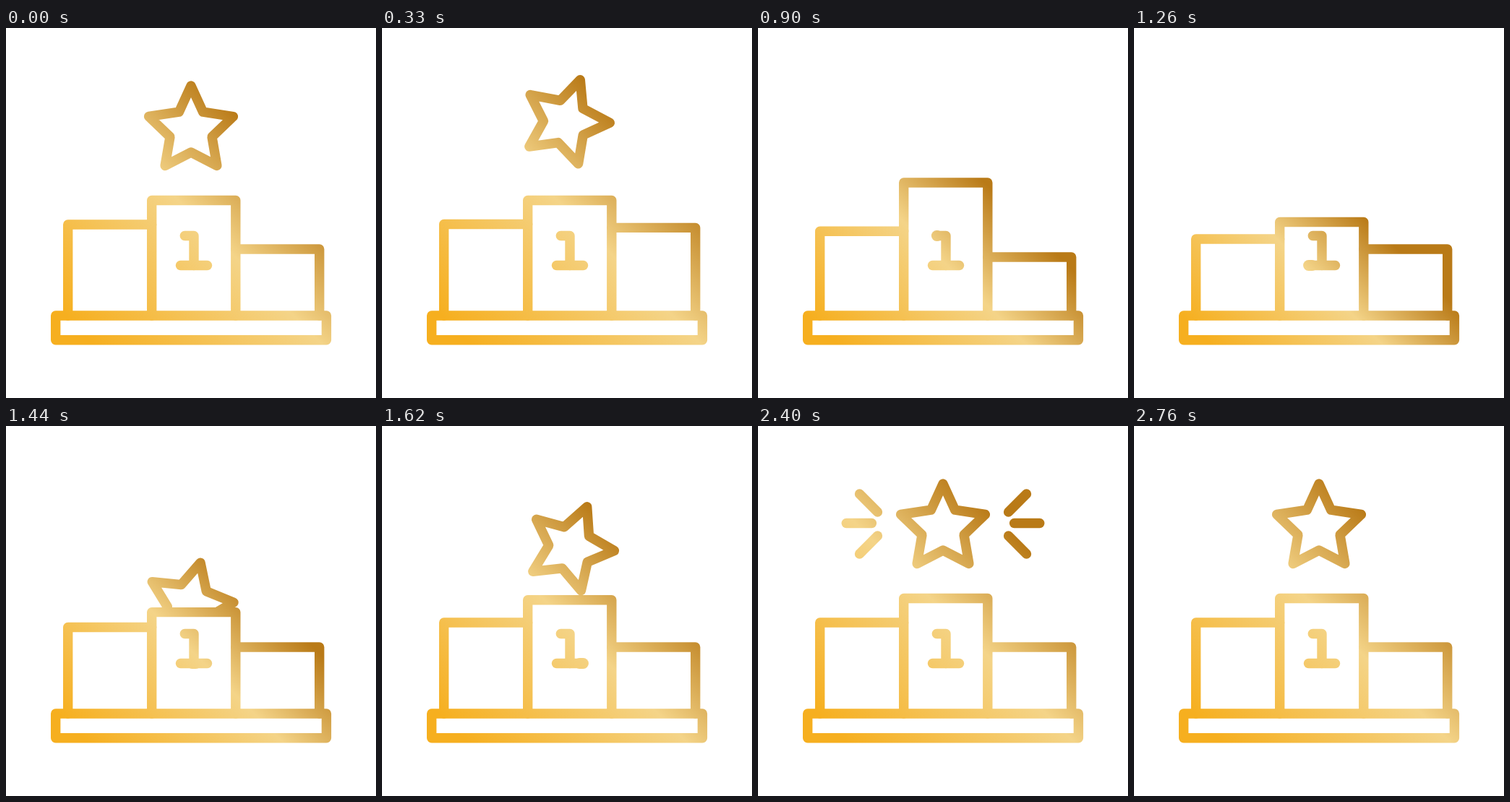
These frames come from a looping animation (512x512 px, 2.91 s). An HTML page with a canvas:

```html
<!DOCTYPE html>
<html lang="en">
<head>
<meta charset="utf-8">
<title>Podium</title>
<style>
  html, body { margin: 0; width: 100%; height: 100%; overflow: hidden; background: #fff; }
  canvas { display: block; width: 100vw; height: 100vh; }
</style>
</head>
<body>
<canvas id="stage" width="512" height="512"></canvas>
<script>
const ctx = document.getElementById('stage').getContext('2d');
const LOOP = 2910, LINE = 13.4, HALF = LINE / 2;
const BASE = { left: 68.7, right: 443.4, top: 398, bottom: 431.7 };
const STAR_PIVOT = 135.2, STAR_DROP = 212;

const clamp = v => Math.min(1, Math.max(0, v));
const span = (t, a, b) => clamp((t - a) / (b - a));
const sine = p => (1 - Math.cos(Math.PI * p)) / 2;
const quadOut = p => 1 - (1 - p) ** 2;
const backIn = p => p * p * (2.4 * p - 1.4);

// Vertical offset of each box: [time, offset] keys, eased in and out.
const RIGHT = [[60, 0], [510, -45], [840, 13], [1080, 0]];
const LEFT = [[300, 0], [660, -27], [1060, 28], [1620, 0]];
const CENTER = [[600, 0], [930, -25], [1260, 30], [1700, 0]];

function track(keys, t) {
  let value = keys[0][1];
  for (let i = 1; i < keys.length; i++) {
    const [t0, v0] = keys[i - 1], [t1, v1] = keys[i];
    if (t >= t0) value = v0 + (v1 - v0) * sine(span(t, t0, t1));
  }
  return value;
}

// Half of the star outline, relative to its pivot, mirrored for the rest.
const SIDE = [[16.6, -19], [58.4, -12.7], [29, 15.5], [35.9, 55.3]];
const STAR = [[0, -55.2], ...SIDE, [0, 36.8],
  ...SIDE.slice().reverse().map(([x, y]) => [-x, y])];

function starDrop(t) {
  return STAR_DROP * (t < 1000
    ? backIn(span(t, 0, 675))
    : 1 - quadOut(span(t, 1320, 1800)));
}

function starPoints(t) {
  const dy = starDrop(t), a = -dy * 1.7 * Math.PI / 180;
  const c = Math.cos(a), s = Math.sin(a);
  return STAR.map(([x, y]) => [256 + x * c - y * s, STAR_PIVOT + dy + x * s + y * c]);
}

function line(points, closed) {
  ctx.beginPath();
  points.forEach(([x, y]) => ctx.lineTo(x, y));
  if (closed) ctx.closePath();
  ctx.stroke();
}

// Diagonal gold, fitted to the bounds of everything visible.
function gold(top) {
  const bottom = BASE.bottom + HALF, cy = (top + bottom) / 2;
  const r = (388 + bottom - top) / 4;
  const g = ctx.createLinearGradient(256 - r, cy + r, 256 + r, cy - r);
  g.addColorStop(0.08, '#f6af1f');
  g.addColorStop(0.5, '#f4d488');
  g.addColorStop(0.77, '#b97a17');
  return g;
}

function drawSparks(t) {
  const from = sine(span(t, 2390, 2750)), to = quadOut(span(t, 1820, 2240));
  if (to <= 0 || from >= 1) return;
  const rays = [[90.5, 119, 25, -25], [98.5, 134.5, 35.3, 0], [90.5, 152, 25, 25]];
  for (const side of [-1, 1])
    for (const [x, y, dx, dy] of rays)
      line([from, to].map(p => [256 + side * (x + dx * p), y + dy * p]));
}

function drawDigit(t) {
  line([[247.3, 287.5], [260, 287.5], [260, 328.5]]);
  line([[241.5, 328.5], [278.5, 328.5]]);
  // A slightly thicker dash runs along the digit.
  if (t < 840 || t > 1740) return;
  ctx.lineWidth = LINE + 1.4;
  if (t < 1230) {
    const y = 287.5 + 41 * sine(span(t, 930, 1230));
    line(t < 930 ? [[247.3, y], [248, y]] : [[260, y - 1], [260, y]]);
  } else {
    const x = 241.5 + 32 * sine(span(t, 1260, 1620));
    line([[x, 328.5], [x + 5, 328.5]]);
  }
  ctx.lineWidth = LINE;
}

function draw(t) {
  const left = 272 + track(LEFT, t);
  const center = 238.5 + track(CENTER, t);
  const right = 306 + track(RIGHT, t);
  const star = starPoints(t);
  const top = Math.min(left, center, right, ...star.map(p => p[1])) - HALF;

  ctx.fillStyle = '#fff';
  ctx.fillRect(0, 0, 512, 512);
  ctx.strokeStyle = gold(top);
  ctx.lineWidth = LINE;
  ctx.lineCap = ctx.lineJoin = 'round';

  ctx.save();
  ctx.beginPath();
  ctx.rect(0, 0, 512, center);
  ctx.clip();
  line(star, true);
  ctx.restore();

  const floor = BASE.top;
  line([[85.7, floor], [85.7, left], [201.7, left]]);
  line([[201.7, floor], [201.7, center], [317.8, center], [317.8, floor]]);
  line([[317.8, right], [433.7, right], [433.7, floor]]);
  line([[BASE.left, BASE.top], [BASE.right, BASE.top],
    [BASE.right, BASE.bottom], [BASE.left, BASE.bottom]], true);
  drawDigit(t);
  drawSparks(t);
}

const start = performance.now();
function tick() {
  draw((performance.now() - start) % LOOP);
  requestAnimationFrame(tick);
}
tick();
</script>
</body>
</html>
```
